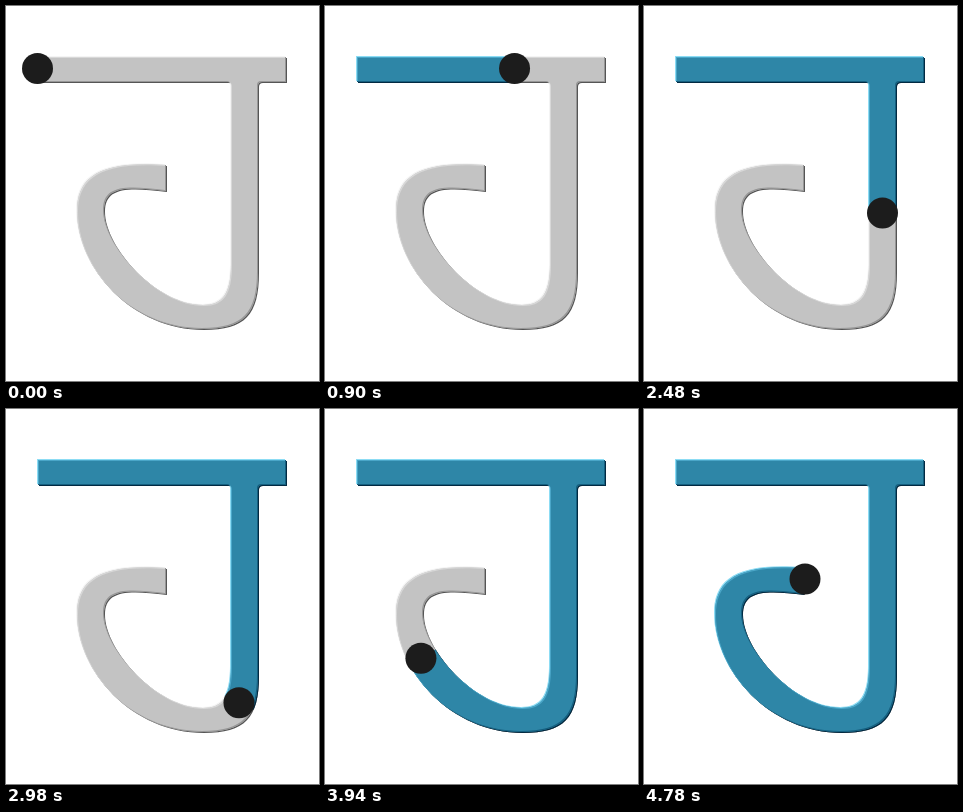
Write an HTML page with a canvas that moves like this. It is 313x375 px and loops after 4800 ms.

```html
<!DOCTYPE html>
<html>
<head>
<meta charset="utf-8">
<style>
  html, body { margin: 0; width: 100%; height: 100%; overflow: hidden; background: #fff; }
  canvas { display: block; }
  svg { position: absolute; width: 0; height: 0; }
</style>
</head>
<body>
<canvas id="stage" width="313" height="375"></canvas>
<svg><path id="stem" d="M238.5 63.5 V262 C238.5 298 226 312 197 312 C140 312 82.5 255 82.5 205 C82.5 176 100 166 161 170"/></svg>
<script>
const W = 313, H = 375;
const LOOP = 4800, STEP = 20, END = 4780;
const SPEED = 0.1756;                       // pixels per ms
const LEFT = 31.5, RIGHT = 281, BAR_Y = 62.5, STEM_X = 238.5;
const BAR = RIGHT - LEFT, BACK = RIGHT - STEM_X;
const STRAIGHT = 198.5;                     // length of the vertical part
const BALL_R = 15.5;

const ctx = document.getElementById('stage').getContext('2d');
const stem = document.getElementById('stem');
const stemPath = new Path2D(stem.getAttribute('d'));
const stemLength = stem.getTotalLength();

const glyph = new Path2D(
  'M32 51 H280 V76 H256 Q252 76 252 80 V266 ' +
  'C252 308 238 323 197 323 C125 323 71 262 71 205 ' +
  'C71 172 92 154 160 159 V185 ' +
  'C118 180 98 181 98 205 C98 240 150 299 197 299 ' +
  'C217 299 225 287 225 258 V79 Q225 76 222 76 H32 Z');

function layer() {
  const canvas = document.createElement('canvas');
  canvas.width = W;
  canvas.height = H;
  return canvas.getContext('2d');
}

function shifted(offset) {
  const path = new Path2D();
  path.addPath(glyph, new DOMMatrix([1, 0, 0, 1, offset, offset]));
  return path;
}

// Two-tone edges: one pixel outside the shape and one inside, lit from the top left.
function bevelled({ fill, light, softLight, dark, softDark }) {
  const g = layer();
  const paint = (path, color, rule = 'nonzero') => {
    g.fillStyle = color;
    g.fill(path, rule);
  };
  const innerRim = (offset, color) => {
    const outside = shifted(offset);
    outside.rect(-9, -9, W + 18, H + 18);
    paint(outside, color, 'evenodd');
  };
  paint(shifted(1), dark);
  paint(shifted(-1), light);
  paint(glyph, fill);
  g.clip(glyph);
  innerRim(1, softLight);
  innerRim(-1, softDark);
  return g.canvas;
}

const grey = bevelled({
  fill: '#c3c3c3', light: '#f4f4f4', softLight: '#d8d8d8', dark: '#555', softDark: '#979797'
});
const blue = bevelled({
  fill: '#2e86a7', light: '#8cdcf4', softLight: '#4aa6c8', dark: '#022a42', softDark: '#155f7f'
});
const trail = layer();

// Distance along the stem; the curve is paced to finish with the loop.
function stemDistance(t) {
  const curveStart = (BAR + BACK + STRAIGHT) / SPEED;
  if (t < curveStart) return Math.max(0, t * SPEED - BAR - BACK);
  const p = Math.min(1, (t - curveStart) / (END - curveStart));
  return STRAIGHT + p * (stemLength - STRAIGHT);
}

function ballAt(t) {
  const s = t * SPEED;
  if (s < BAR) return { x: LEFT + s, y: BAR_Y };
  if (s < BAR + BACK) return { x: RIGHT - (s - BAR), y: BAR_Y };
  return stem.getPointAtLength(stemDistance(t));
}

function drawTrail(t) {
  const s = t * SPEED, down = stemDistance(t);
  trail.globalCompositeOperation = 'source-over';
  trail.clearRect(0, 0, W, H);
  const reach = s < BAR ? LEFT + s : RIGHT + 4;
  trail.fillRect(28, BAR_Y - 17.5, reach - 28, 35);
  if (down > 0) {
    trail.lineWidth = 37;
    trail.setLineDash([down, 2000]);
    trail.stroke(stemPath);
  }
  trail.globalCompositeOperation = 'source-in';
  trail.drawImage(blue, 0, 0);
}

function draw(t) {
  ctx.fillStyle = '#fff';
  ctx.fillRect(0, 0, W, H);
  ctx.drawImage(grey, 0, 0);
  if (t > 0) {
    drawTrail(t);
    ctx.drawImage(trail.canvas, 0, 0);
  }
  const ball = ballAt(t);
  ctx.fillStyle = '#1c1c1c';
  ctx.beginPath();
  ctx.arc(ball.x, ball.y, BALL_R, 0, Math.PI * 2);
  ctx.fill();
}

const start = performance.now();
function tick() {
  const t = (performance.now() - start) % LOOP;
  draw(Math.floor(t / STEP) * STEP);
  requestAnimationFrame(tick);
}
tick();
</script>
</body>
</html>
```
